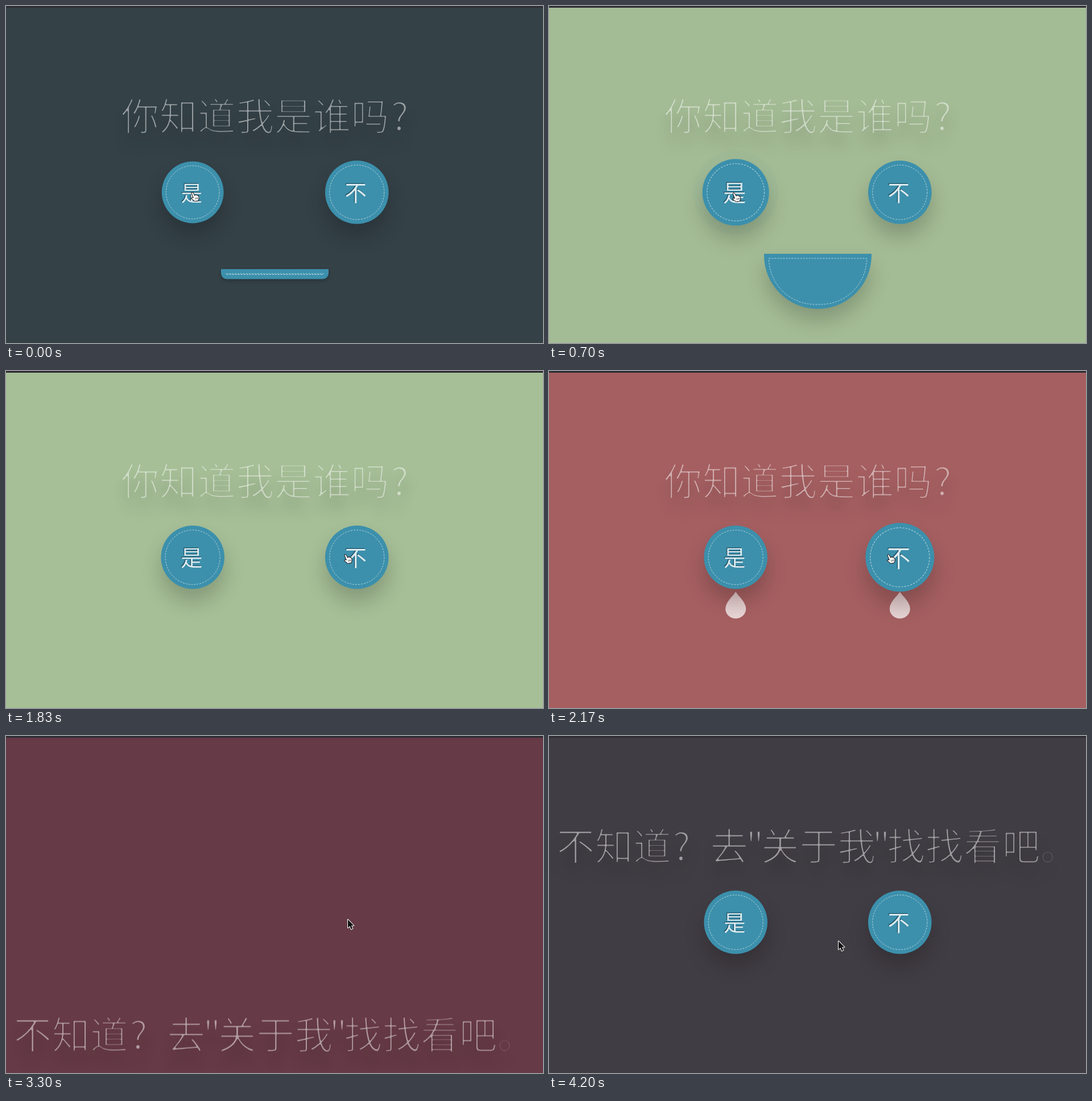
Write an HTML page with a canvas that moves like this. It is 944x593 px and loops after 4230 ms.

```html
<!DOCTYPE html>
<html lang="zh-CN">
<head>
<meta charset="utf-8">
<title>你知道我是谁吗?</title>
<style>
  html, body { margin: 0; width: 100%; height: 100%; overflow: hidden; background: #344147; }
  canvas { display: block; }
</style>
</head>
<body>
<canvas id="stage" width="944" height="593"></canvas>
<script>
const LOOP = 4230, W = 944, H = 593;
const FONT = '"Noto Sans CJK SC", "Noto Sans CJK", "Noto Sans", sans-serif';
const TEAL = '#3c90ac';
const ctx = document.getElementById('stage').getContext('2d');

// Tracks are lists of [time, value or values, easing into this step].
const linear = p => p;
const soft = p => (1 - Math.cos(Math.PI * p)) / 2;
const easeIn = p => p * p;
const easeOut = p => 1 - (1 - p) ** 2;

const tracks = {
  bg: [
    [0, [52, 65, 71]], [430, [100, 117, 107]], [900, [178, 204, 158], easeOut],
    [1640, [178, 204, 158]], [1830, [166, 191, 151], easeIn], [2170, [165, 95, 97]],
    [2380, [165, 53, 73], easeOut], [2760, [165, 53, 73]], [3300, [102, 58, 70]],
    [3720, [75, 60, 69], easeOut], [4200, [65, 61, 68]]
  ],
  yes: [[0, .975], [430, .805, soft], [900, 1.2, soft], [1640, 1.2], [1800, 1, soft]],
  no: [[1850, 1], [2170, 1.083, easeIn], [2380, 1.2, easeOut], [2800, 1.2], [3000, 1, soft]],
  mouth: [[0, 17], [430, 95, easeOut], [520, 97, easeOut], [1640, 97], [1810, 0, easeIn]],
  ring: [[640, 67], [900, 97], [1280, 117, easeOut]],
  ringAlpha: [[640, 0], [760, .07], [900, .06], [1280, 0]],
  tear: [[1900, -34], [2170, 0], [2640, 33]],
  tearAlpha: [[1900, 0], [2170, .74], [2480, .74], [2660, 0]],
  slide: [[2780, 0], [3070, 440, easeIn], [3130, 440], [3300, 333], [3820, 0, easeOut]],
  mouse: [
    [0, [332, 328]], [430, [325, 329], soft], [900, [332, 329], soft], [1560, [332, 329]],
    [1800, [601, 323], soft], [3700, [601, 323]], [4080, [509, 361], soft]
  ]
};

function at(name, t) {
  const steps = tracks[name];
  const i = steps.findIndex(s => s[0] > t);
  if (i === 0) return steps[0][1];
  if (i < 0) return steps[steps.length - 1][1];
  const [t0, a] = steps[i - 1], [t1, b, ease = linear] = steps[i];
  const p = ease((t - t0) / (t1 - t0));
  return Array.isArray(a) ? a.map((v, k) => v + (b[k] - v) * p) : a + (b - a) * p;
}

const TITLE_SIZE = 67.4, TITLE_STROKE = 2.4;

function makeCanvas(w, h) {
  const c = document.createElement('canvas');
  c.width = w;
  c.height = h;
  return c;
}

// Thickness of a horizontal stroke at title size, for the installed weight.
function strokeWidth() {
  const g = makeCanvas(200, 240).getContext('2d');
  g.font = `100 200px ${FONT}`;
  g.fillText('一', 0, 180);
  const column = g.getImageData(100, 0, 1, 240).data;
  let sum = 0;
  for (let i = 3; i < column.length; i += 4) sum += column[i];
  return sum / 255 * TITLE_SIZE / 200;
}

// Title drawn in white, with strokes trimmed or thickened to a hairline.
function makeTitle(runs) {
  const c = makeCanvas(W, 140), g = c.getContext('2d');
  const excess = strokeWidth() - TITLE_STROKE;
  g.font = `100 ${TITLE_SIZE}px ${FONT}`;
  g.fillStyle = g.strokeStyle = '#fff';
  g.lineJoin = 'round';
  g.lineWidth = Math.max(.05, Math.abs(excess));
  for (const [text, x] of runs) g.fillText(text, x, 100);
  if (excess > 0) g.globalCompositeOperation = 'destination-out';
  for (const [text, x] of runs) g.strokeText(text, x, 100);
  return c;
}

const question = makeTitle([['你知道我是谁吗', 202], ['?', 676]]);
const answer = makeTitle([
  ['不知道', 13], ['?', 217], ['去', 283], ['"', 346],
  ['关于我', 372.5], ['"', 568], ['找找看吧。', 594]
]);

function shadow(color, x, y, blur) {
  ctx.shadowColor = color;
  ctx.shadowOffsetX = x;
  ctx.shadowOffsetY = y;
  ctx.shadowBlur = blur;
}
const noShadow = () => shadow('transparent', 0, 0, 0);

function drawTitle(img, dy) {
  const far = 2000, y = 119 + dy;
  shadow('rgba(0,0,0,.32)', far, 24, 22);
  ctx.drawImage(img, -far, y);
  noShadow();
  ctx.globalAlpha = .5;
  ctx.drawImage(img, 0, y);
  ctx.globalAlpha = 1;
}

function stitch() {
  ctx.strokeStyle = 'rgba(255,255,255,.6)';
  ctx.lineWidth = 1;
  ctx.setLineDash([3, 2]);
  ctx.stroke();
  ctx.setLineDash([]);
}

function disc(r) {
  ctx.beginPath();
  ctx.arc(0, 0, r, 0, 2 * Math.PI);
}

function drawButton(x, y, scale, label) {
  ctx.save();
  ctx.translate(x, y);
  ctx.scale(scale, scale);
  shadow('rgba(0,0,0,.2)', 0, 22 * scale, 36 * scale);
  ctx.fillStyle = TEAL;
  disc(55.8);
  ctx.fill();
  noShadow();
  disc(48);
  stitch();
  ctx.font = `300 38.5px ${FONT}`;
  ctx.textAlign = 'center';
  shadow('rgba(0,30,45,.7)', -1, -1, 1);
  ctx.fillStyle = '#dcebf0';
  ctx.fillText(label, -2, 15.5);
  ctx.restore();
}

function bowl(x, y, w, h, r) {
  ctx.beginPath();
  ctx.roundRect(x, y, w, h, [0, 0, r, r]);
}

function drawMouth(h) {
  if (h < 1) return;
  const r = 94.5 * (h / 97) ** 1.3, top = 469 - h * .34;
  ctx.fillStyle = TEAL;
  shadow('rgba(0,0,0,.2)', 0, 20 * h / 97, 36 * h / 97);
  bowl(378, top, 189, h, r);
  ctx.fill();
  noShadow();
  if (h < 16.5) return;
  bowl(386.5, top + 8, 172, h - 16, Math.max(0, r - 8));
  stitch();
}

const tearShape = new Path2D('M0-29C5-21 18-11 18 1A18 17 0 0 1-18 1C-18-11-5-21 0-29Z');

function drawTear(x, y, alpha) {
  ctx.save();
  ctx.translate(x, y);
  const fade = ctx.createLinearGradient(0, -29, 0, 18);
  fade.addColorStop(0, 'rgba(255,255,255,.84)');
  fade.addColorStop(1, '#fff');
  ctx.globalAlpha = alpha;
  ctx.fillStyle = fade;
  ctx.fill(tearShape);
  ctx.restore();
}

const hand = new Path2D('M1 2Q2 0 4 2L7 7V5.5Q8 4.5 9 6L10 5.8Q11 5.2 11.8 6.8' +
  'Q13.2 6.4 13.8 8.5Q14.5 12 13 15.5L6.5 16.5Q4 13.5 1 12Q0 10 3 10.3L4.5 10.8Z');
const knuckles = new Path2D('M7.5 10.5L8.5 13.5M9.5 10L10.5 13M11.3 9.6L12 12.4');
const arrow = new Path2D('M0 0V14.6L3.4 11.5L5.7 17L8.3 15.9L6 10.6H10.4Z');

function drawPointer(x, y, isHand) {
  ctx.save();
  ctx.translate(isHand ? x - 7 : x, isHand ? y - 1 : y);
  ctx.lineJoin = 'round';
  ctx.lineWidth = isHand ? 1.2 : 2;
  ctx.fillStyle = isHand ? '#fff' : '#111';
  ctx.strokeStyle = isHand ? '#111' : '#fff';
  ctx.stroke(arrow === null || isHand ? hand : arrow);
  ctx.fill(isHand ? hand : arrow);
  if (isHand) {
    ctx.lineWidth = .7;
    ctx.stroke(hand);
    ctx.stroke(knuckles);
  }
  ctx.restore();
}

function draw(t) {
  const dy = at('slide', t), y = 327.8 + dy;
  const buttons = [
    { x: 328.2, scale: at('yes', t), label: '是' },
    { x: 616.8, scale: at('no', t), label: '不' }
  ];
  ctx.fillStyle = `rgb(${at('bg', t).map(Math.round)})`;
  ctx.fillRect(0, 0, W, H);

  drawTitle(t < 3100 ? question : answer, dy);

  const ringAlpha = at('ringAlpha', t);
  if (ringAlpha > 0) {
    ctx.save();
    ctx.translate(buttons[0].x, y);
    ctx.fillStyle = `rgba(60,144,172,${ringAlpha})`;
    disc(at('ring', t));
    ctx.fill();
    ctx.restore();
  }
  for (const b of buttons) drawTear(b.x, 417.5 + at('tear', t) + dy, at('tearAlpha', t));
  for (const b of buttons) drawButton(b.x, y, b.scale, b.label);
  drawMouth(at('mouth', t));

  ctx.fillStyle = '#2e2d34';
  ctx.fillRect(0, 0, W, 3);

  const [mx, my] = at('mouse', t);
  const over = buttons.some(b => Math.hypot(mx - b.x, my - y) < 56 * b.scale);
  drawPointer(mx, my, over);
}

const start = performance.now();
function tick() {
  draw((performance.now() - start) % LOOP);
  requestAnimationFrame(tick);
}
tick();
</script>
</body>
</html>
```
